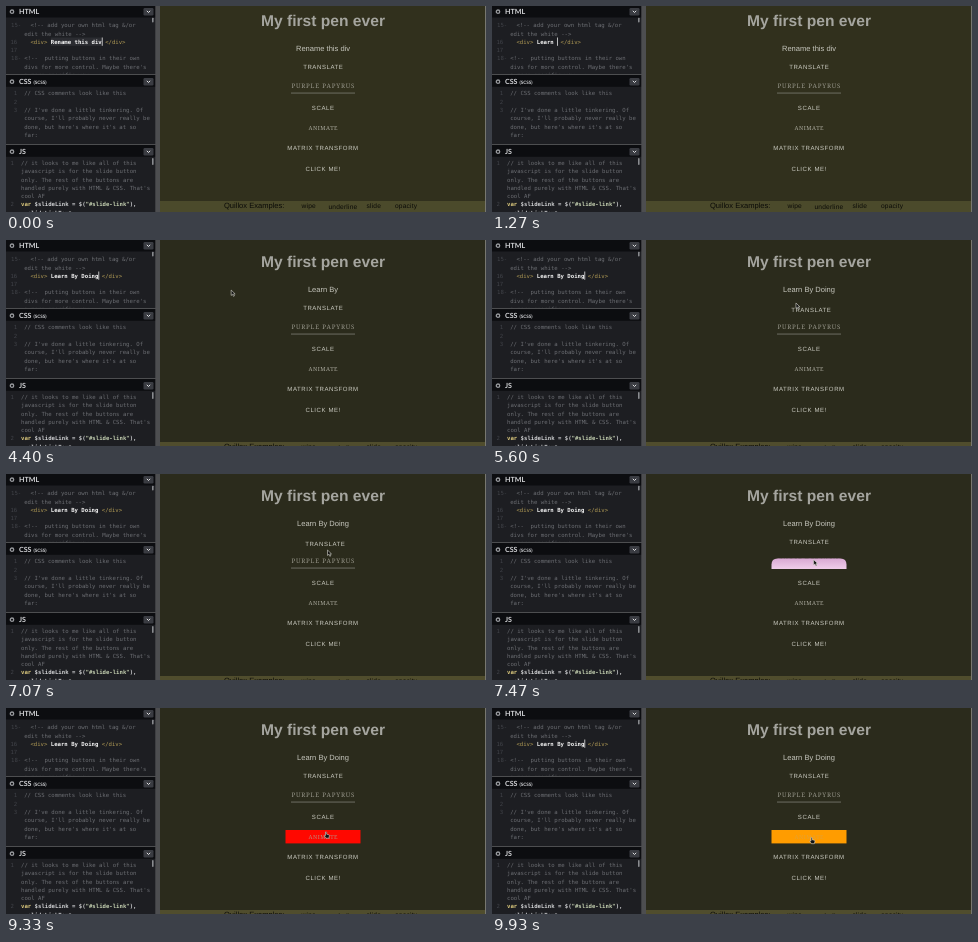
Recreate the animation shown at these times as an HTML page. Size 480 by 206 pixels, loop 9990 ms.

```html
<!DOCTYPE html>
<html lang="en">
<head>
<meta charset="utf-8">
<title>My first pen ever</title>
<style>
  html, body { margin: 0; width: 100%; height: 100%; overflow: hidden; background: #1d1e22; }
  svg { display: block; width: 480px; height: 206px; }
  text { white-space: pre; text-rendering: geometricPrecision; }
  .code { font: 5.65px "DejaVu Sans Mono", monospace; fill: #cfd0d2; }
  .strong { font-weight: bold; }
  .note { fill: #6c6e73; }
  .num { fill: #414349; }
  .tag { fill: #b09a55; font-weight: normal; }
  .key { fill: #ddca7e; }
  .str { fill: #c3cfb0; }
  .bar { fill: #0c0d10; }
  .edge { fill: #4d4e50; }
  .head { font: bold 7.1px Lato, sans-serif; fill: #d6d7da; }
  .page { font-family: "Liberation Sans", Arial, sans-serif; text-anchor: middle; }
  .title { font-size: 15.6px; font-weight: bold; fill: #a5a59f; }
  .label { font-size: 7.55px; fill: #c6c6bd; }
  .link { font-size: 6.05px; letter-spacing: .57px; fill: #cbcbc1; }
  .serif { font-family: "Noto Serif", serif; font-size: 5.6px; letter-spacing: .5px; fill: #aaa99d; }
  .wide { font-size: 6.2px; letter-spacing: .8px; fill: #98978b; }
  .foot { font-size: 6.6px; letter-spacing: .2px; fill: #0b0b08; text-anchor: start; }
</style>
</head>
<body>
<svg viewBox="0 0 480 206">
  <defs>
    <g id="tools">
      <circle cx="6" cy="5.7" r="1.7" fill="none" stroke="#97999d" stroke-width="1.3"/>
      <rect x="137.5" y="2" width="10" height="7.4" rx="1.2" fill="#3a3c42"/>
      <path d="M140.8 4.8l1.7 1.7 1.7-1.7" fill="none" stroke="#e0e0e2"/>
    </g>
    <linearGradient id="lilac" x2="0" y2="1">
      <stop stop-color="#d9a9d3"/><stop offset="1" stop-color="#f0cdea"/>
    </linearGradient>
  </defs>

  <rect width="150" height="206" fill="#1d1e22"/>
  <g id="code" class="code"></g>
  <g class="code strong">
    <rect id="mark" x="44.8" y="31.5" width="51" height="8.3" fill="#2b2c31"/>
    <text x="24.4" y="37.7"><tspan class="tag">&lt;div&gt;</tspan> <tspan id="typed" fill="#f4f4f4"></tspan> <tspan class="tag">&lt;/div&gt;</tspan></text>
    <rect id="caret" y="31.5" width=".8" height="8.3" fill="#e4e4e4"/>
    <text x="15" y="200.3"><tspan class="key">var</tspan> $slideLink = $(<tspan class="str">"#slide-link"</tspan>),</text>
    <text x="15" y="208.6">  slideLinkText</text>
  </g>
  <rect x="146" y="11.5" width="1.6" height="5" rx=".8" fill="#8a8c90"/>
  <rect x="146" y="152" width="1.6" height="7" rx=".8" fill="#8a8c90"/>
  <g class="head">
    <rect class="bar" width="150" height="11.5"/>
    <rect class="bar" y="68.5" width="150" height="12.3"/>
    <rect class="bar" y="138.5" width="150" height="12.3"/>
    <rect class="edge" y="68" width="150" height="1"/>
    <rect class="edge" y="138" width="150" height="1"/>
    <use href="#tools"/><use href="#tools" y="70"/><use href="#tools" y="140"/>
    <text x="13" y="8.3">HTML</text>
    <text x="13" y="78.2">CSS</text>
    <text x="27.5" y="78" style="font-size:4.6px">(SCSS)</text>
    <text x="13" y="148.2">JS</text>
  </g>

  <rect id="back" x="154" width="326" height="206"/>
  <rect class="edge" x="149.3" width="4.7" height="206"/>
  <g id="page" class="page">
    <rect id="strip" x="154" y="202" width="326" height="12"/>
    <text class="title" x="317" y="26.5">My first pen ever</text>
    <text id="label" class="label" x="317" y="51.8"></text>
    <text id="shift" class="link" x="317.3" y="70.3">TRANSLATE</text>
    <text id="purple" class="link serif wide" x="317.3" y="89.2">PURPLE PAPYRUS</text>
    <rect id="line" x="285" y="93.6" width="64" height=".9" fill="#74746a"/>
    <path id="fill" fill="url(#lilac)"/>
    <text id="scale" class="link" x="317.2" y="110.5">SCALE</text>
    <rect id="paint" x="279.5" y="122" width="75" height="13.4"/>
    <text id="animate" class="link serif" x="317.3" y="130.7">ANIMATE</text>
    <text class="link" x="317" y="151.3">MATRIX TRANSFORM</text>
    <text class="link" x="317.2" y="171.5">CLICK ME!</text>
    <text class="foot" x="218" y="209" style="font-size:7.55px;letter-spacing:0">Quillox Examples:</text>
    <text class="foot" x="295.5" y="209">wipe</text>
    <text class="foot" x="322.5" y="209.5">underline</text>
    <text class="foot" x="360.5" y="209">slide</text>
    <text class="foot" x="389" y="209">opacity</text>
  </g>
  <rect x="479" width="1" height="206" fill="#77776f"/>
  <g id="mouse" fill="#111" stroke="#d8d8d0" stroke-width=".6" stroke-linejoin="round">
    <path id="arrow" d="M0 0v5.4l1.3-1.1 1 2 1-.5-1-1.9h1.7z"/>
    <path id="hand" d="M0 0q.9-.6 1.2 .4v1.8l2.2 .6q.7 .3 .5 1.2l-.6 2.2H.4L-1.3 3.6q0-.9 1.3-.1z"/>
  </g>
</svg>
<script>
const LOOP = 9990, CHAR = 3.4, TEXT_X = 44.8;
const $ = id => document.getElementById(id);
const ramp = (t, a, b) => Math.min(1, Math.max(0, (t - a) / (b - a)));
const ease = p => p * p * (3 - 2 * p);
const show = (id, on) => $(id).setAttribute("visibility", on ? "visible" : "hidden");
const set = (id, name, value) => $(id).setAttribute(name, value);

function block(x, y, rows) {
  rows.forEach(([num, line, indent = 0], i) => {
    const add = (x, cls, s, anchor) => {
      const el = document.createElementNS("http://www.w3.org/2000/svg", "text");
      el.setAttribute("x", x);
      el.setAttribute("y", y + i * 8.3);
      el.setAttribute("class", cls);
      el.setAttribute("text-anchor", anchor);
      el.textContent = s;
      $("code").append(el);
    };
    add(x - (num.endsWith("-") ? 3 : 7), "num", num, "end");
    add(x + indent, "note", line, "start");
  });
}
block(18.2, 21.2, [
  ["15-", "<!-- add your own html tag &/or", 6.2],
  ["", "edit the white -->"],
  ["16", ""],
  ["17", ""],
  ["18-", "<!--  putting buttons in their own"],
  ["", "divs for more control. Maybe there's"],
  ["", "a more specific way -->"]
]);
block(18.2, 89.3, [
  ["1", "// CSS comments look like this"],
  ["2", ""],
  ["3", "// I've done a little tinkering. Of"],
  ["", "course, I'll probably never really be"],
  ["", "done, but here's where it's at so"],
  ["", "far:"]
]);
block(15, 158.9, [
  ["1", "// it looks to me like all of this"],
  ["", "javascript is for the slide button"],
  ["", "only. The rest of the buttons are"],
  ["", "handled purely with HTML & CSS. That's"],
  ["", "cool AF"],
  ["2", ""]
]);

const OLD = "Rename this div", NEW = "Learn By Doing";
const keys = [530, 730, 870, 1000, 1130, 1270, 1600, 1800, 1940, 2730, 2800, 2930, 3070, 3270];

// time, x, y of the pointer tip
const path = [
  [4000, 180, 45], [4400, 225, 50], [4900, 306, 66], [5400, 307, 64], [5600, 304, 63],
  [5670, 300, 63], [5870, 300, 63], [5930, 308, 66], [6070, 308, 66], [6730, 321, 68],
  [7070, 321.5, 76], [7400, 322, 85], [7800, 320, 89], [8130, 318.5, 97], [8400, 317, 104],
  [8800, 318, 108], [9330, 319.5, 124], [9800, 319, 129.5], [9990, 319, 129.5]
];

function pointer(t) {
  const i = Math.max(1, path.findIndex(p => p[0] > t));
  const [t0, x0, y0] = path[i - 1], [t1, x1, y1] = path[i];
  const p = ramp(t, t0, t1);
  return [x0 + (x1 - x0) * p, y0 + (y1 - y0) * p];
}

function draw(t) {
  const count = keys.filter(k => k <= t).length;
  const typed = count ? NEW.slice(0, count) : OLD;
  const blink = t - (count ? keys[count - 1] : 0);
  $("typed").textContent = typed;
  set("caret", "x", TEXT_X + typed.length * CHAR);
  show("caret", Math.floor(blink / 530) % 2 === 0);
  show("mark", !count);

  const fresh = t >= 3670;
  set("page", "transform", `translate(0 ${fresh ? 0 : -7})`);
  set("back", "fill", fresh ? "#2b2b1c" : "#31301d");
  set("strip", "fill", fresh ? "#504d2d" : "#4b4a2b");
  $("label").textContent = !fresh ? OLD : t < 5270 ? "Learn By" : NEW;

  const d = 2 * (ramp(t, 4830, 4930) - ramp(t, 7130, 7270));
  set("shift", "transform", `translate(${d} ${d})`);

  const h = 15 * (ease(ramp(t, 7250, 7600)) - ease(ramp(t, 7990, 8250)));
  const r = Math.min(6, h), top = 95 - h;
  show("fill", h > .3);
  show("line", h <= .3);
  set("fill", "d", `M279.5 95V${top + r}q0-${r} ${r}-${r}H${354.5 - r}q${r} 0 ${r} ${r}V95z`);
  $("purple").style.fill = h > .3 ? "#8a6385" : "";

  const s = 1 + .2 * (ease(ramp(t, 8370, 8600)) - ease(ramp(t, 8950, 9150)));
  set("scale", "transform", `translate(317 108.3) scale(${s}) translate(-317 -108.3)`);

  const hot = t >= 9300, warm = ramp(t, 9300, 10330);
  show("paint", hot);
  set("paint", "fill", `rgb(255 ${Math.round(255 * warm)} 0)`);
  set("animate", "opacity", hot ? .8 - .8 * warm : 1);

  show("mouse", t >= 4000);
  set("mouse", "transform", `translate(${pointer(t)})`);
  set("arrow", "display", hot ? "none" : "inline");
  set("hand", "display", hot ? "inline" : "none");
}

const start = performance.now();
function tick() {
  draw((performance.now() - start) % LOOP);
  requestAnimationFrame(tick);
}
tick();
</script>
</body>
</html>
```
